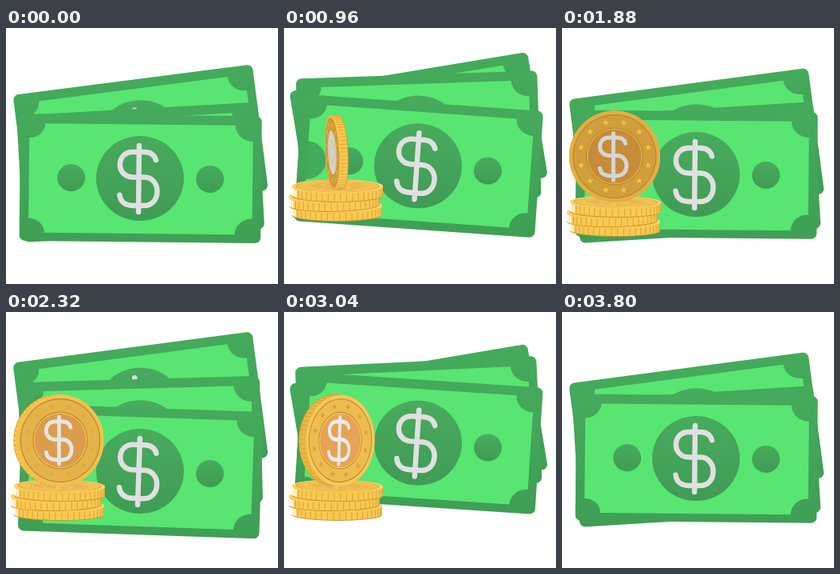
Animation, 341 px wide and 320 px high, one loop 3.84 s. Source, as an HTML page with a canvas:

```html
<!DOCTYPE html>
<html lang="en">
<head>
<meta charset="utf-8">
<title>Cash and coins</title>
<style>
  html, body { margin: 0; width: 100%; height: 100%; overflow: hidden; background: #fff; }
  canvas { display: block; }
</style>
</head>
<body>
<canvas id="stage" width="341" height="320"></canvas>
<script>
const ctx = document.getElementById('stage').getContext('2d');
const LOOP = 3840, STEP = 40, SWAY = 1920, TAU = Math.PI * 2;
const R = 57;

const dollar = new Path2D(
  'M-2.2 -41V42M19 -23C17 -30 11 -33 4 -33H-10C-20 -33 -26 -26 -26 -17' +
  'C-26 -8 -19 -1.5 -10 -1.5H5C14 -1.5 21 6 21 16C21 27 14 34 5 34H-10C-19 34 -25 29 -26 21');

// y and angle: mean, cosine and sine parts of one sway
const notes = [
  { y: [139.2, 6.5, -19], turn: [-8.4, 1, 0.7], sign: true },
  { y: [159, 21.5, -1.5], turn: [-2.65, -0.7, 1.3] },
  { y: [179, 6.6, 19], turn: [2.3, -1.75, 0.1], sign: true, shaded: true }
];

// resting place, pop-in and pop-out times, bottom coin first
const stack = [
  { x: 66, y: 241.5, tilt: 0.4, grow: [160, 400], shrink: [3020, 3360] },
  { x: 63, y: 229.5, tilt: -0.8, grow: [250, 530], shrink: [3080, 3420] },
  { x: 67, y: 217.5, tilt: 0.6, grow: [480, 740], shrink: [3130, 3465] }
];

const spin = [[720, -190], [960, -79], [1400, -20], [1880, 0], [2720, 31], [3400, 54], [3640, 75]];
const lean = [[720, -3], [960, -3], [1880, 0], [2720, 0], [3400, 5], [3640, 6]];
const shadow = {
  x: [[160, 20], [480, 20], [960, 28], [3840, 28]],
  y: [[160, 125], [480, 135], [960, 165], [3840, 165]],
  r: [[160, 0], [480, 67], [960, 25], [3200, 22], [3400, 18], [3520, 0]]
};

const clamp = v => Math.min(1, Math.max(0, v));
const part = (t, [a, b]) => clamp((t - a) / (b - a));
const popIn = (t, span) => 1 - (1 - part(t, span)) ** 2;
const popOut = (t, span) => 1 - part(t, span) ** 2;

// smooth curve through [time, value] pairs
function curve(keys, t) {
  const n = keys.length - 1;
  if (t <= keys[0][0]) return keys[0][1];
  if (t >= keys[n][0]) return keys[n][1];
  const i = keys.findIndex(k => k[0] > t) - 1;
  const slope = j => {
    if (j <= 0 || j >= n) return 0;
    const a = (keys[j][1] - keys[j - 1][1]) / (keys[j][0] - keys[j - 1][0]);
    const b = (keys[j + 1][1] - keys[j][1]) / (keys[j + 1][0] - keys[j][0]);
    return a * b > 0 ? 2 * a * b / (a + b) : 0;
  };
  const [t0, v0] = keys[i], [t1, v1] = keys[i + 1];
  const d = t1 - t0, u = (t - t0) / d, w = 1 - u;
  return v0 * (1 + 2 * u) * w * w + d * slope(i) * u * w * w +
    v1 * u * u * (3 - 2 * u) - d * slope(i + 1) * u * u * w;
}

function blend(a, b, u) {
  return 'rgb(' + a.map((v, i) => Math.round(v + (b[i] - v) * u)).join(',') + ')';
}

function sway([mean, c, s], t) {
  const a = t / SWAY * TAU;
  return mean + c * Math.cos(a) + s * Math.sin(a);
}

function fade(top, bottom, h) {
  const g = ctx.createLinearGradient(0, -h, 0, h);
  g.addColorStop(0, top);
  g.addColorStop(1, bottom);
  return g;
}

function oval(x, y, rx, ry, fill) {
  ctx.beginPath();
  ctx.ellipse(x, y, Math.max(0, rx), Math.max(0, ry), 0, 0, TAU);
  ctx.fillStyle = fill;
  ctx.fill();
}

function drawDollar(scale, width, color) {
  ctx.save();
  ctx.scale(scale, scale);
  ctx.lineWidth = width;
  ctx.lineCap = ctx.lineJoin = 'round';
  ctx.strokeStyle = color;
  ctx.stroke(dollar);
  ctx.restore();
}

// light panel with a round bite out of each corner
function drawPanel(left, top, right, bottom) {
  const q = TAU / 4;
  ctx.beginPath();
  ctx.ellipse(left, top, 20, 18, 0, q, 0, true);
  ctx.ellipse(right, top, 22, 20, 0, 2 * q, q, true);
  ctx.ellipse(right, bottom, 22, 20, 0, 3 * q, 2 * q, true);
  ctx.ellipse(left, bottom, 20, 18, 0, 0, -q, true);
  ctx.fillStyle = '#58e572';
  ctx.fill();
}

function drawNote(note, t) {
  const y = sway(note.y, t), turn = sway(note.turn, t) * Math.PI / 180;
  ctx.save();
  ctx.translate(168.7, y);
  ctx.rotate(turn);
  const outline = new Path2D();
  outline.roundRect(-151.3, -79.2, 302.6, 158.6, 7);
  ctx.fillStyle = fade('#45aa5c', '#3f9f55', 78);
  ctx.fill(outline);
  drawPanel(-140, -67.5, 140.5, 69);

  oval(-0.7, 0, 55, 53, fade('#48ab5e', '#409b55', 53));
  for (const cx of [-87, 87]) oval(cx, 0, 17.5, 17, fade('#48ab5e', '#3f9c53', 17));
  if (note.sign) drawDollar(1, 6.5, '#e0e0e0');

  if (note.shaded) {
    const r = curve(shadow.r, t);
    ctx.clip(outline);
    ctx.rotate(-turn);
    ctx.translate(-168.7, -y);
    oval(curve(shadow.x, t), curve(shadow.y, t), r, r * 0.95, 'rgba(66,166,90,.9)');
  }
  ctx.restore();
}

function star(x, y, r) {
  ctx.beginPath();
  for (let i = 0; i < 10; i++) {
    const a = i * TAU / 10 - TAU / 4, d = i % 2 ? r * 0.4 : r;
    ctx.lineTo(x + d * Math.cos(a), y + d * Math.sin(a));
  }
  ctx.fill();
}

// side wall reaching from the face (fx, fy) to the back (bx, by)
function drawWall(rx, ry, fx, fy, bx, by, look) {
  const dx = bx - fx, dy = by - fy;
  const n = Math.ceil(Math.hypot(dx, dy)) + 1;
  for (let i = 0; i <= n; i++) {
    const u = 1 - i / n;
    oval(fx + dx * u, fy + dy * u, rx, ry, u > 0.94 ? '#cf962f' : look.side);
  }
  for (let i = 0; i < look.reeds; i++) {
    const a = i * TAU / look.reeds, c = Math.cos(a), s = Math.sin(a);
    if (c * ry * dx + s * rx * dy <= 0) continue;
    const shine = look.glint && c < -0.88;
    ctx.beginPath();
    ctx.moveTo(fx + rx * c + dx * 0.12, fy + ry * s + dy * 0.12);
    ctx.lineTo(fx + rx * c + dx * 0.9, fy + ry * s + dy * 0.9);
    ctx.strokeStyle = shine ? '#fff8e6' : '#d69f38';
    ctx.lineWidth = shine ? 2.2 : 0.9;
    ctx.stroke();
  }
}

function drawFace(x, y, rx, ry, look) {
  ctx.save();
  ctx.translate(x, y);
  ctx.scale(Math.max(0.01, rx / R), Math.max(0.01, ry / R));
  oval(0, 0, R, R, look.rim);
  oval(0, 0, 52.5, 52.5, look.line);
  oval(0, 0, 51.3, 51.3, look.ring);
  if (look.stars) {
    ctx.fillStyle = look.stars;
    for (let i = 0; i < 12; i++) {
      const a = (i + 0.5) * TAU / 12;
      star(43.5 * Math.cos(a), 43.5 * Math.sin(a), 4.4);
    }
  }
  oval(0, 0, 36, 36, look.line);
  oval(0, 0, 35, 35, look.rim);
  oval(0, 0, 33.5, 33.5, look.disc);
  drawDollar(0.71, 7, look.sign);
  ctx.restore();
}

const flatLook = {
  side: '#fac951', reeds: 46, glint: true,
  rim: '#fdd56c', line: '#d39c3a', ring: '#f3c253', disc: '#ebb550', sign: '#f3c561'
};

function drawStackCoin(coin, t) {
  const s = popIn(t, coin.grow) * popOut(t, coin.shrink);
  if (s < 0.02) return;
  const fall = part(t, [313, 1161]);
  const lift = 75 * (1 + Math.cos(Math.PI * fall));
  const ry = 7.5 + 3 * (1 - fall);
  ctx.save();
  ctx.translate(coin.x, coin.y + 6 - lift);
  ctx.rotate((coin.tilt - 2 * (1 - fall)) * Math.PI / 180);
  ctx.scale(s, s);
  drawWall(57, ry, 0, -6, 0, 6, flatLook);
  drawFace(0, -6, 57, ry, flatLook);
  ctx.restore();
}

function drawSpinCoin(t) {
  const s = popIn(t, [720, 1140]) * popOut(t, [3300, 3600]);
  if (s < 0.02) return;
  const a = curve(spin, t) * Math.PI / 180, c = Math.cos(a);
  const half = -7 * Math.sin(a) * Math.sign(c);
  const rx = R * Math.abs(c);
  const dusk = part(t, [2720, 3400]);
  const glow = part(t, [1880, 2720]) * (1 - 0.5 * dusk);
  const pale = part(t, [1400, 960]);
  ctx.save();
  ctx.translate(66, 160.5 - 5 * part(t, [1300, 960]));
  ctx.rotate(curve(lean, t) * Math.PI / 180);
  ctx.scale(s, s);
  drawWall(rx, R, -half, 0, half, 0, {
    side: blend([250, 200, 80], [222, 160, 52], dusk), reeds: 60
  });
  drawFace(-half, 0, rx, R, {
    rim: blend([228, 174, 66], [254, 208, 96], glow),
    line: '#b9842f',
    ring: blend([208, 158, 60], [247, 198, 86], glow),
    stars: blend([240, 194, 72], [206, 152, 58], glow),
    disc: pale > 0
      ? blend([198, 140, 58], [212, 204, 182], pale)
      : blend([198, 140, 58], [239, 170, 97], glow),
    sign: blend([214, 214, 212], [244, 242, 239], glow)
  });
  ctx.restore();
}

function draw(t) {
  ctx.fillStyle = '#fff';
  ctx.fillRect(0, 0, 341, 320);
  notes.forEach(note => drawNote(note, t));
  stack.forEach(coin => drawStackCoin(coin, t));
  drawSpinCoin(t);
}

const start = performance.now();
function tick() {
  const t = (performance.now() - start) % LOOP;
  // the opening pose is held for two steps
  draw(Math.max(STEP, Math.floor(t / STEP) * STEP));
  requestAnimationFrame(tick);
}
tick();
</script>
</body>
</html>
```
